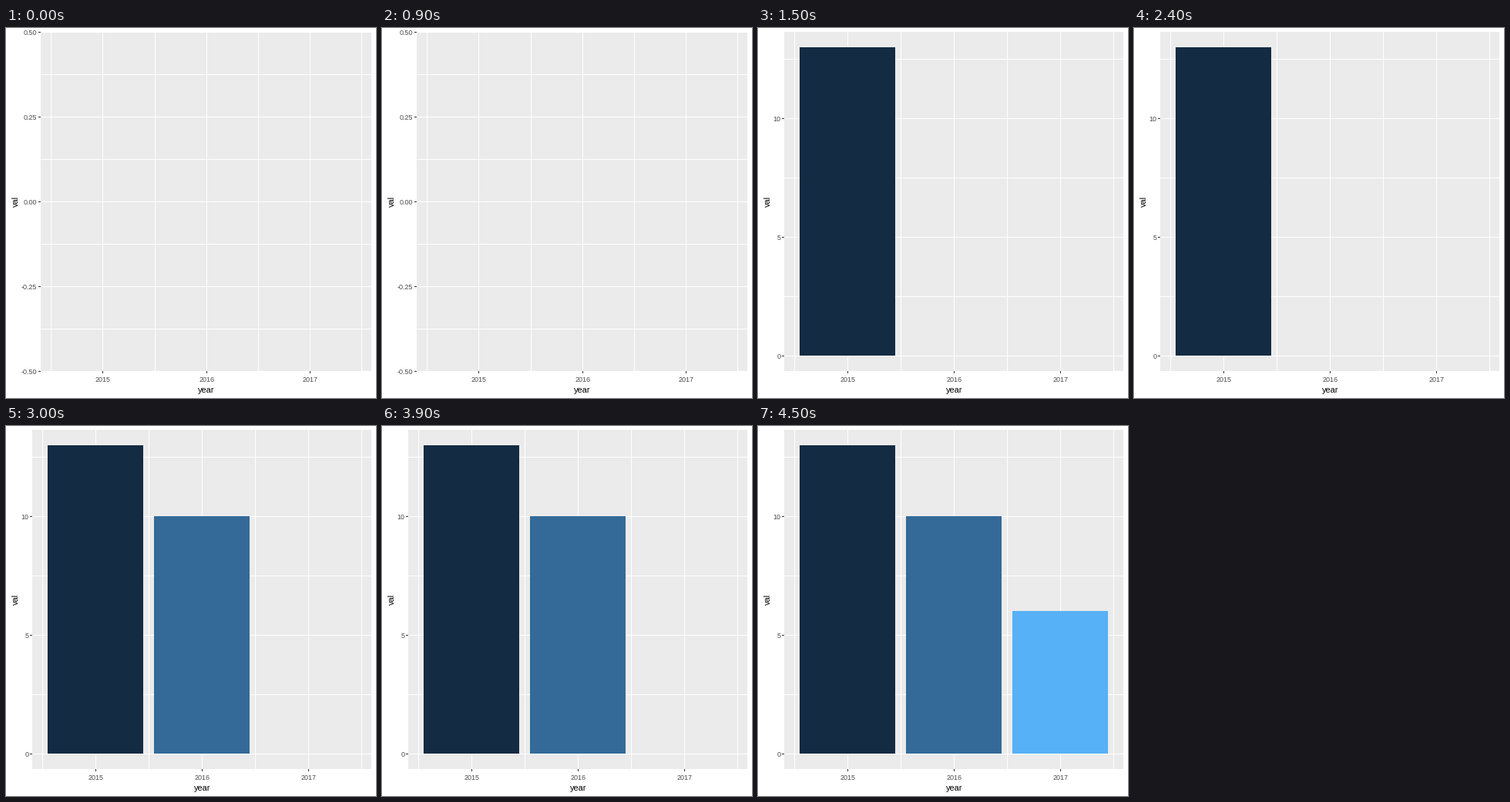
Animation, 480 px wide and 480 px high, one loop 6 s. Source, as a matplotlib script:

```python
import matplotlib.pyplot as plt
from matplotlib.animation import FuncAnimation
from matplotlib.patches import Rectangle

SIZE, DPI = 480, 80
PT_PER_PX = 72 / DPI
RIGHT, TOP, BOTTOM = 474, 5, 445
YEARS = (2015, 2016, 2017)
VALUES = (13, 10, 6)
FILLS = ("#132B43", "#336A98", "#56B1F7")

plt.rcParams["font.family"] = "Liberation Sans"
fig = plt.figure(figsize=(SIZE / DPI, SIZE / DPI), dpi=DPI, facecolor="white")
ax = fig.add_axes([0, 0, 1, 1])


def box(left, top, right, bottom, color):
    ax.add_patch(Rectangle((left, top), right - left, bottom - top,
                           facecolor=color, linewidth=0))


def label(x, y, text, px=9, color="#4D4D4D", ha="center", rotation=0):
    ax.text(x, y, text, fontsize=px * PT_PER_PX, color=color, ha=ha,
            va="baseline", rotation=rotation, rotation_mode="anchor")


def draw_panel(left, x_major, x_minor, y_major, y_minor):
    """Grey panel, white grid, ticks and labels; y_major maps row to text."""
    box(left, TOP, RIGHT, BOTTOM, "#EBEBEB")
    for x in (*x_minor, *x_major):
        box(x, TOP, x + 1, BOTTOM, "white")
    for y in (*y_minor, *y_major):
        box(left, y, RIGHT, y + 1, "white")
    for y, text in y_major.items():
        box(left - 3, y, left, y + 1, "#333333")
        label(left - 4.5, y + 4, text, ha="right")
    for x, year in zip(x_major, YEARS):
        box(x, BOTTOM, x + 1, BOTTOM + 3, "#333333")
        label(x + 0.3, 459, str(year))
    label((left + RIGHT) / 2 + 0.3, 473, "year", 11, "black")
    label(16, 225, "val", 11, "black", rotation=90)


def draw_bars(count):
    base, unit = 425, 400 / 13
    for i in range(count):
        left = 54 + 138 * i
        box(left, round(base - VALUES[i] * unit), left + 124, base, FILLS[i])


def update(step):
    ax.clear()
    ax.set(xlim=(0, SIZE), ylim=(SIZE, 0))
    ax.axis("off")
    if step == 0:
        rows = {5 + 110 * i: f"{0.5 - 0.25 * i:.2f}" for i in range(5)}
        draw_panel(45, (125, 260, 394), (58, 193, 327, 461),
                   rows, range(60, 400, 110))
    else:
        draw_panel(34, (116, 254, 392), range(47, 470, 138),
                   {425: "0", 271: "5", 117: "10"}, (348, 194, 40))
        draw_bars(step)
    return ax.patches


anim = FuncAnimation(fig, update, frames=4, interval=1500,
                     repeat=True, repeat_delay=0, blit=False)
plt.show()
```
